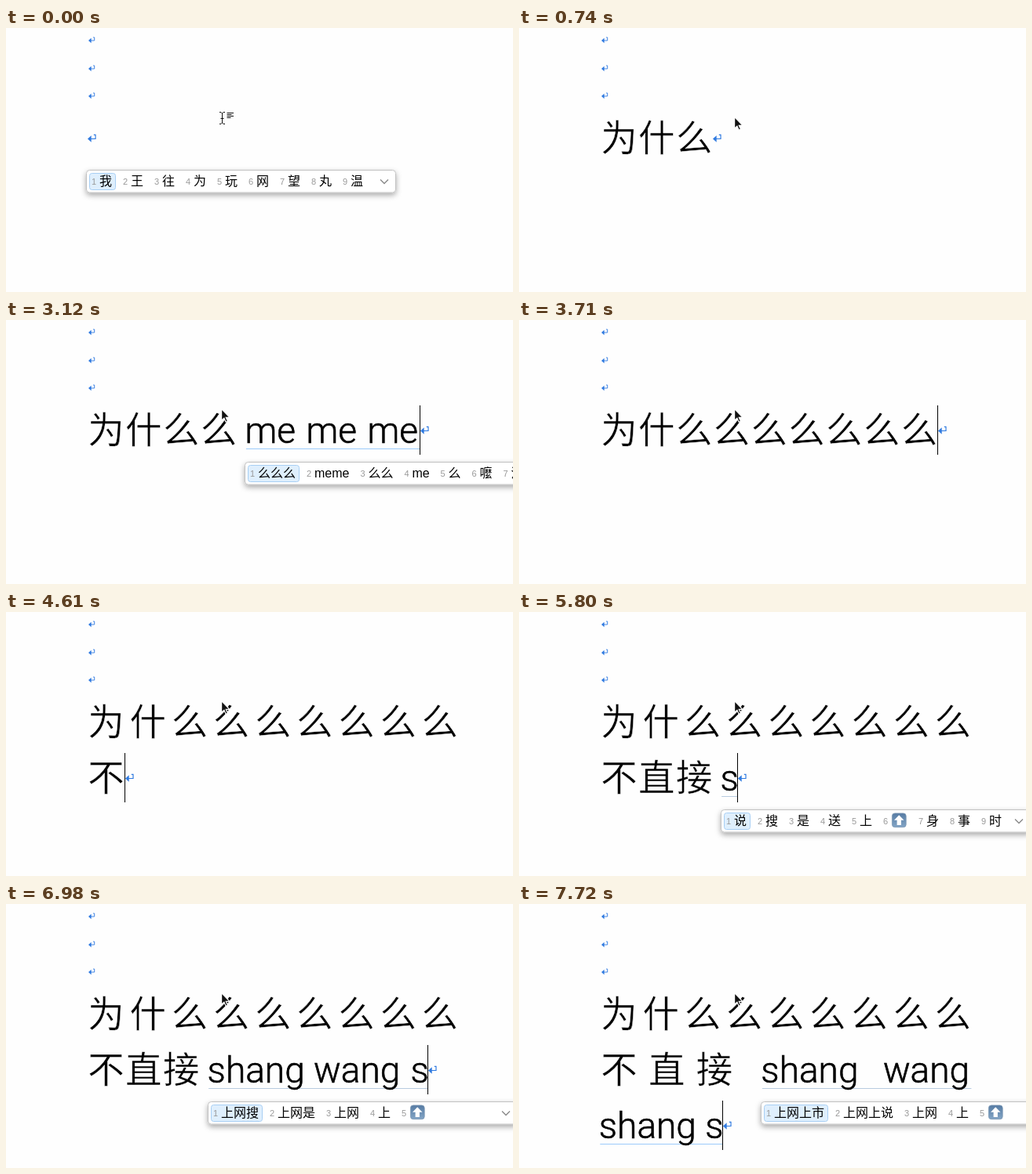
An HTML page that plays this animation: 646 by 337 pixels, repeating every 8000 ms.

```html
<!DOCTYPE html>
<html lang="zh">
<head>
<meta charset="utf-8">
<style>
html, body { margin: 0; width: 100%; height: 100%; overflow: hidden; background: #fefefe; }
svg { display: block; width: 646px; height: 337px; }
.han { font: 400 46.5px "Noto Sans CJK SC", "Noto Sans CJK", sans-serif; stroke: #fefefe; stroke-width: .5px; }
.pin { font: 300 46px Roboto, sans-serif; stroke: #000; stroke-width: .6px; }
.num { font: 11px "Liberation Sans", sans-serif; fill: #999; }
.cand { font: 16px "Liberation Sans", "Noto Sans CJK SC", "Noto Sans CJK", sans-serif; }
</style>
</head>
<body>
<svg viewBox="0 0 646 337">
  <defs>
    <filter id="shadow" x="-5%" y="-50%" width="110%" height="220%">
      <feDropShadow dx="0" dy="3" stdDeviation="3.6" flood-color="#000" flood-opacity=".34"/>
    </filter>
    <linearGradient id="key" x2="0" y2="1">
      <stop stop-color="#567ba3"/>
      <stop offset="1" stop-color="#83a5c6"/>
    </linearGradient>
    <g id="mark">
      <path d="M0 0L3.6 -3.2V3.2Z" fill="#2f7ae0"/>
      <path d="M3 0H7.7V-4H6" fill="none" stroke="#2f7ae0" stroke-width=".9"/>
    </g>
    <g id="beam" fill="none" stroke="#111">
      <path d="M272 107.5h2l1.5 1.5 1.5-1.5h2M275.5 109v12M272 122.5h2l1.5-1.5 1.5 1.5h2M273.5 115.5h4"/>
      <path d="M281.5 108.5h8.5M281.5 110.5h6M281.5 112.5h8.5M281.5 114.5h5"/>
    </g>
    <path id="arrow" d="M274.6 113.6v14.6l3.3-3 2.2 5 2.4-1-2.2-4.9h4.7Z" fill="#111" stroke="#fff" stroke-width="1.2"/>
    <g id="up">
      <rect x=".4" y=".4" width="17.8" height="17.8" rx="3.5" fill="url(#key)" stroke="#7d98b4" stroke-width=".8"/>
      <path d="M9.2 2.8L15.5 9.3H11.9V15.5H6.6V9.3H3Z" fill="#fff"/>
    </g>
    <g id="calendar">
      <rect x=".5" y=".5" width="18" height="18" fill="#f4f4f4" stroke="#c4c4c4"/>
      <rect width="19" height="6" fill="#d9584f"/>
      <text x="9.5" y="16" text-anchor="middle" font-family="Liberation Sans, sans-serif" font-size="11" font-weight="700" fill="#333">17</text>
    </g>
  </defs>
  <g id="page"></g>
</svg>
<script>
const LOOP = 8000, LEFT = 103.3, RIGHT = 576.4, LINE = 71, HAN = 47.8;
const advance = { s: 20.5, h: 26.5, a: 24, n: 26, g: 26, w: 35, m: 40.5, e: 25, b: 27, u: 26.5, i: 11, z: 22, j: 11 };
const WHY = '为什么', LONG = '为什么么么么么么么', ASK = LONG + '不直接';

// time, committed text, pinyin, candidates, caret hidden
const steps = [
  [0, '', '', '我 王 往 为 玩 网 望 丸 温', 1],
  [150, '', 'w', '我 王 往 为 玩 网 望 丸 温'],
  [300, '', 'w s', '完善 晚上 网上 为啥 卫生 往上 我是'],
  [450, '', 'w s m', '为什么 完世美 我说 我是 玩 网'],
  [590, '', 'w s m', '为什么 无神明 我说 我是 玩 网'],
  [740, WHY, '', '', 1],
  [1040, WHY, 'm', '吗 没 嘛 们 么 妈 买 慢 忙'],
  [1190, WHY, 'me', '么 me 嚒 么么 没 们 门 美'],
  [1330, WHY, 'me', '么 me 嚒 末 没 们 门 美'],
  [1480, WHY + '么', '', ''],
  [2080, WHY + '么', '', '', 1],
  [2530, WHY + '么', 'm', '吗 没 嘛 们 么 妈 买 慢 忙'],
  [2680, WHY + '么', 'me', '么 me 嚒 么么 没 们 门 美'],
  [2830, WHY + '么', 'me me', '么么 meme me 么 嚒 没 们'],
  [2970, WHY + '么', 'me me m', '么么么 么么 meme me 么 嚒'],
  [3120, WHY + '么', 'me me me', '么么么 meme 么么 me 么 嚒 没'],
  [3270, WHY + '么', 'me me me me', '么么么么 么么么 么么 me 么 嚒'],
  [3410, WHY + '么', 'me me me me me', '么么么么么 么么么 么么 me 么'],
  [3710, LONG, '', ''],
  [4310, LONG, 'b', '不 吧 把 被 比 别 并 本 帮'],
  [4460, LONG, 'bu', '不 部 步 布 补 捕 哺 簿 卜'],
  [4610, LONG + '不', '', ''],
  [4910, LONG + '不', 'z', '在 再 做 这 最 走 早 总 怎'],
  [5060, LONG + '不', 'zh', '这 中 只 着 之 找 真 种 张'],
  [5200, LONG + '不', 'zhi', '只 之 直 知 值 指 至 纸 制'],
  [5350, LONG + '不', 'zhi j', '直接 之间 至今 之际 只 之 直'],
  [5500, LONG + '不', 'zhi jie', '直接 之界 指节 只 之 直 知'],
  [5650, ASK, '', ''],
  [5800, ASK, 's', '说 搜 是 送 上 ↑ 身 事 时'],
  [5940, ASK, 'sh', '是 上 ↑ 说 时 事 谁 啥 身'],
  [6090, ASK, 'sha', '啥 沙 傻 杀 纱 上 ↑ 莎 煞'],
  [6240, ASK, 'shang', '上 ↑ 伤 商 尚 赏 裳 晌 殇'],
  [6390, ASK, 'shang w', '上网 上午 商务 # 尚未 伤亡'],
  [6540, ASK, 'shang wa', '上网 上万 商湾 上 ↑ 伤'],
  [6680, ASK, 'shang wan', '上网 上万 上完 上 ↑ 伤'],
  [6830, ASK, 'shang wang', '上网 伤亡 上 ↑ 伤 商'],
  [6980, ASK, 'shang wang s', '上网搜 上网是 上网 上 ↑'],
  [7130, ASK, 'shang wang sh', '上网是 上网上 上网 上 ↑'],
  [7270, ASK, 'shang wang sha', '上网啥 上网杀 上网 上 ↑'],
  [7420, ASK, 'shang wang shang', '上网上 上网商 上网 上 ↑'],
  [7720, ASK, 'shang wang shang s', '上网上市 上网上说 上网 上 ↑'],
];

const page = document.getElementById('page');
const use = (id, x = 0, y = 0, k = 1) => `<use href="#${id}" transform="translate(${x} ${y}) scale(${k})"/>`;
const rect = (x, y, w, h, style) => `<rect x="${x}" y="${y}" width="${w}" height="${h}" ${style}/>`;
const label = (cls, x, y, s) => `<text class="${cls}" x="${x}" y="${y}">${s}</text>`;
const wordWidth = s => [...s].reduce((sum, c) => sum + advance[c], 0);

// Natural gap and share of the justification slack between two neighbours
function spacing(a, b) {
  if (!a) return [0, 0];
  if (a.pin && b.pin) return [12.5, 1.55];
  return b.pin ? [11.4, 2] : [0, 1];
}

function layout(text, pinyin) {
  const tokens = [...text].map(s => ({ s, w: HAN }));
  if (pinyin) for (const s of pinyin.split(' ')) tokens.push({ s, w: wordWidth(s), pin: true });
  const lines = [[]];
  let end = LEFT;
  for (const tok of tokens) {
    let line = lines.at(-1);
    let [gap, share] = spacing(line.at(-1), tok);
    if (end + gap + tok.w > RIGHT) {
      justify(line, RIGHT - end);
      lines.push(line = []);
      end = LEFT;
      gap = share = 0;
    }
    tok.x = end + gap;
    tok.share = share;
    tok.row = lines.length - 1;
    end = tok.x + tok.w;
    line.push(tok);
  }
  return { lines, tokens, end };
}

function justify(line, slack) {
  const total = line.reduce((sum, t) => sum + t.share, 0) || 1;
  let used = 0;
  for (const t of line) {
    used += t.share;
    t.x += slack * used / total;
  }
}

function candWidth(s) {
  if (s === '↑' || s === '#') return 21;
  return [...s].reduce((sum, c) => sum + ({ m: 13.3, e: 8.9 }[c] || 16), 0);
}

function popup(left, top, list) {
  let out = rect(left + .5, top + .5, 394, 28.5, 'rx="4" fill="#fff" stroke="#c2c2c2" filter="url(#shadow)"');
  let x = left + 7;
  list.split(' ').forEach((s, i) => {
    const w = candWidth(s);
    if (!i) out += rect(x - 2.5, top + 4.5, w + 17, 21, 'rx="3" fill="#dfeffd" stroke="#a8cff4"');
    out += label('num', x, top + 19, i + 1);
    if (s === '↑') out += use('up', x + 11, top + 4.5);
    else if (s === '#') out += use('calendar', x + 10.5, top + 4);
    else out += label('cand', x + 10, top + 20, s);
    x += w + 24;
  });
  return out + `<path d="M${left + 375} ${top + 12.5}l5 5 5-5" fill="none" stroke="#888" stroke-width="1.3"/>`;
}

function draw([time, text, pinyin, list, noCaret]) {
  const { lines, tokens, end } = layout(text, pinyin);
  let out = [16, 52, 87].map(y => use('mark', 105, y)).join('');
  lines.forEach((line, row) => {
    const base = 157 + row * LINE;
    const words = line.filter(t => t.pin);
    if (words.length) {
      const last = words.at(-1), x = words[0].x;
      out += rect(x, base + 7, last.x + last.w - x, 1, `fill="${row === 1 ? '#b8cbe0' : '#9ccbfa'}"`);
    }
    for (const t of line) out += t.pin ? label('pin', t.x - 1.5, base, t.s) : label('han', t.x + 1, base - .5, t.s);
  });
  const row = lines.length - 1, caret = Math.floor(end);
  if (!noCaret) out += rect(caret, 109 + row * LINE, 1, 63, 'fill="#000"');
  out += use('mark', caret + 1, 141.5 + row * LINE, 1.3);
  if (list) {
    const first = tokens.find(t => t.pin) || { x: LEFT, row: 0 };
    out += popup(Math.floor(first.x + .05) - 1, 181 + first.row * LINE, list);
  }
  page.innerHTML = out + use(time < 150 ? 'beam' : 'arrow');
}

let shown;
function tick() {
  const t = performance.now() % LOOP;
  const step = steps.findLast(s => s[0] <= t);
  if (step !== shown) draw(shown = step);
  requestAnimationFrame(tick);
}
tick();
</script>
</body>
</html>
```
